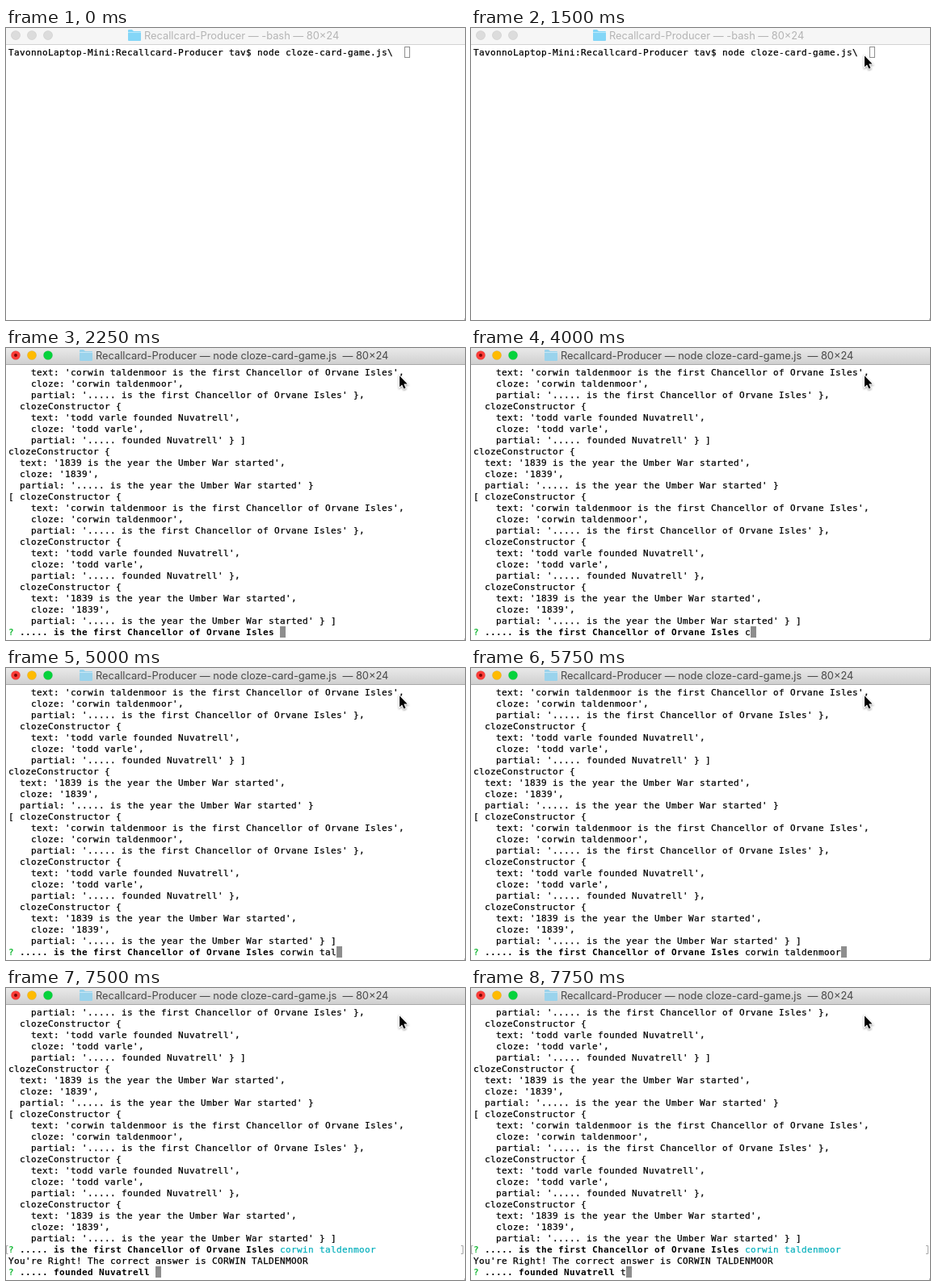
An HTML page that plays this animation: 568 by 362 pixels, repeating every 8000 ms.

```html
<!DOCTYPE html>
<html lang="en">
<head>
<meta charset="utf-8">
<title>Terminal quiz</title>
<style>
  html, body { margin: 0; width: 100%; height: 100%; overflow: hidden; background: #fff; }
  svg, pre { position: absolute; left: 0; top: 0; }
  pre {
    left: 3px; top: 24px; margin: 0; color: #000;
    font: 11px/14px "DejaVu Sans Mono", monospace;
    letter-spacing: calc(7px - 1ch); /* 7px terminal cells */
    -webkit-text-stroke: .25px;
  }
  b { -webkit-text-stroke: 0; }
  #cursor { position: absolute; box-sizing: border-box; width: 7px; height: 14px; border: 1px solid #8e8e8e; }
  .active #cursor { background: #8e8e8e; }
  .ask { color: #1dbb3c; }
  .reply { color: #08b0bd; }
  #title { font: 12.85px Inter, sans-serif; white-space: pre; fill: #b4b4b4; }
  .active #title { fill: #484848; }
  #bar { fill: #f6f6f6; }
  .active #bar { fill: url(#shade); }
  #edge { fill: #d2d2d2; }
  .active #edge { fill: #a8a8a8; }
  .light { fill: #dcdcdc; stroke: #0001; }
  .active .red { fill: #fc3d39; }
  .active .amber { fill: #ffbb00; }
  .active .green { fill: #05d33c; }
  #dot { fill: none; }
  .active #dot { fill: #7c0606; }
  #folder { fill: #84d6f7; }
  .active #folder { fill: #9ad3ec; }
  #marks { fill: none; stroke: #a8a8a8; }
  #pointer { filter: drop-shadow(0 1px 1px #0006); }
</style>
</head>
<body>
<svg width="568" height="362">
  <linearGradient id="shade" x2="0" y2="1">
    <stop stop-color="#e9e9e9"/><stop offset="1" stop-color="#d0d0d0"/>
  </linearGradient>
  <rect id="bar" width="568" height="20"/>
  <rect id="edge" y="20" width="568" height="1"/>
  <circle class="light red" cx="12" cy="9" r="5.6"/>
  <circle class="light amber" cx="32" cy="9" r="5.6"/>
  <circle class="light green" cx="52" cy="9" r="5.6"/>
  <circle id="dot" cx="12" cy="9" r="2"/>
  <g id="heading">
    <path id="folder" d="M0 3q0-1 1-1h4l2 2h8q1 0 1 1v10q0 1-1 1H1q-1 0-1-1z"/>
    <path d="M0 5.5h16" stroke="#fff" stroke-opacity=".45"/>
    <text id="title" x="20" y="14"></text>
  </g>
  <path id="marks" d="M2.5 2.5h-2v10h2M563 2.5h2.5v10H563"/>
  <rect x="567" y="360" width="1" height="2" fill="#bbb"/>
</svg>
<pre id="screen"></pre>
<div id="cursor"></div>
<svg width="568" height="362">
  <path id="pointer" d="M0 0V13.8L3.1 10.9L5.4 16L7.5 15.1L5.3 10H9.6Z" stroke="#fff" paint-order="stroke" stroke-width="2"/>
</svg>
<script>
const $ = id => document.getElementById(id);
const LOOP = 8000, STEP = 250, ROWS = 24, CELL = 7, LINE = 14;

const PROJECT = 'Recallcard-Producer';
const COMMAND = `TavonnoLaptop-Mini:${PROJECT} tav$ node cloze-card-game.js\\  `;
const ANSWER = 'corwin taldenmoor';

const facts = [
  [ANSWER, 'is the first Chancellor of Orvane Isles'],
  ['todd varle', 'founded Nuvatrell'],
  ['1839', 'is the year the Umber War started'],
];

function card(index, open, pad, close) {
  const [cloze, rest] = facts[index];
  return [
    `${open}clozeConstructor {`,
    `${pad}text: '${cloze} ${rest}',`,
    `${pad}cloze: '${cloze}',`,
    `${pad}partial: '..... ${rest}' }${close}`,
  ];
}

const dump = [
  ...card(0, '[ ', '    ', ','),
  ...card(1, '  ', '    ', ' ]'),
  ...card(2, '', '  ', ''),
  ...card(0, '[ ', '    ', ','),
  ...card(1, '  ', '    ', ','),
  ...card(2, '  ', '    ', ' ]'),
];

const question = (index, typed) =>
  `<b><span class="ask">?</span> ..... ${facts[index][1]}</b> ${typed}`;

const answered = [
  ...dump,
  question(0, `<span class="reply">${ANSWER}</span>`),
  `You're Right! The correct answer is ${ANSWER.toUpperCase()}`,
];

// Letters typed so far: 1, then 4, then two per step, and a final three.
function typedCount(t) {
  const n = Math.floor((t - 4000) / STEP);
  return n < 0 ? 0 : n === 0 ? 1 : n < 7 ? 2 + 2 * n : ANSWER.length;
}

function pointerAt(t) {
  if (t < 750) return [600, 100];
  if (t < 1000) return [562.5, 77.5];
  if (t < 1250) return [472.5, 1];
  if (t < 1500) return [492.5, 41];
  return [487, 34.5];
}

function sceneAt(t) {
  if (t < 2000) return { lines: [COMMAND], column: COMMAND.length, row: 0 };
  if (t < 2250) return { lines: [COMMAND], column: 0, row: 1, marks: 0 };
  const first = t < 6000;
  const index = first ? 0 : 1;
  const typed = first ? ANSWER.slice(0, typedCount(t)) : t < 7750 ? '' : facts[1][0][0];
  return {
    lines: [...(first ? dump : answered), question(index, typed)].slice(-ROWS),
    column: '? ..... '.length + facts[index][1].length + 1 + typed.length,
    row: ROWS - 1,
    marks: first ? undefined : ROWS - 3,
  };
}

let shown = -1;

function render(t) {
  const step = Math.floor(t / STEP);
  if (step === shown) return;
  shown = step;

  const running = t >= 2000;
  const { lines, column, row, marks } = sceneAt(t);
  document.body.className = t >= 1750 ? 'active' : '';
  $('heading').setAttribute('transform', `translate(${running ? 91 : 151})`);
  $('title').textContent = `${PROJECT} — ${running ? 'node cloze-card-game.js ' : '-bash'} — 80×24`;
  $('screen').innerHTML = lines.join('\n');
  $('cursor').style.left = 3 + column * CELL + 'px';
  $('cursor').style.top = 23 + row * LINE + 'px';
  $('marks').setAttribute('visibility', marks === undefined ? 'hidden' : 'visible');
  $('marks').setAttribute('transform', `translate(0 ${23 + (marks || 0) * LINE})`);
  $('pointer').setAttribute('transform', `translate(${pointerAt(t)})`);
}

function tick() {
  render(performance.now() % LOOP);
  requestAnimationFrame(tick);
}
tick();
</script>
</body>
</html>
```
